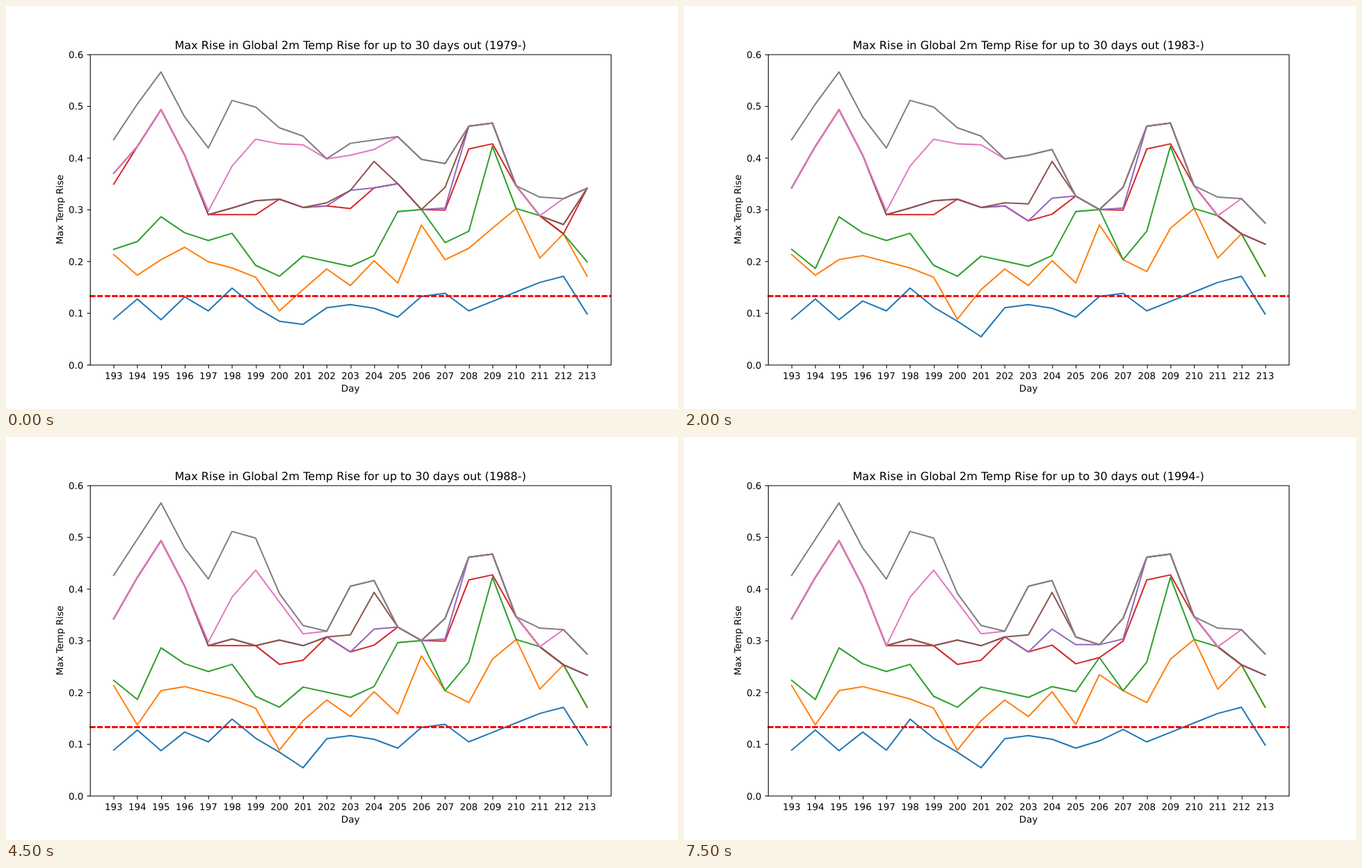
Animation, 966 px wide and 580 px high, one loop 8 s. Source, as an HTML page with a canvas:

```html
<!DOCTYPE html>
<html lang="en">
<head>
<meta charset="utf-8">
<title>Max temperature rise</title>
<style>
html, body { margin: 0; width: 966px; height: 580px; overflow: hidden; background: #fff; }
canvas { display: block; }
</style>
</head>
<body>
<canvas id="chart" width="966" height="580"></canvas>
<script>
const ctx = document.getElementById('chart').getContext('2d');
// The chart is laid out on a 1000 x 600 sheet and scaled to the stage.
const W = 1000, H = 600, LEFT = 125, RIGHT = 900, TOP = 72, BOTTOM = 534;
const POINT = 100 / 72, THIN = 0.8 * POINT, THICK = 1.5 * POINT, TICK = 3.5 * POINT;
const FIRST_DAY = 193, DAYS = 21, FIRST_YEAR = 1979, YEARS = 16, STEP = 500;
const THRESHOLD = 132.5;
const COLORS = ['#1f77b4', '#ff7f0e', '#2ca02c', '#d62728',
                '#9467bd', '#8c564b', '#e377c2', '#7f7f7f'];
const [BLUE, ORANGE, GREEN, RED, PURPLE, BROWN, PINK, GREY] = COLORS.keys();

const xOf = i => LEFT + (RIGHT - LEFT) * (i + 1) / (DAYS + 1);
const yOf = v => BOTTOM - (BOTTOM - TOP) * v / 600;
const snap = v => Math.round(v) + 0.5;

// A record lifts its line, and every line above it, until the year it drops out.
// Values are thousandths of a degree on successive days; gaps are straight runs.
const records = [];
const record = (line, day, values, until = Infinity) =>
  records.push({ line, start: day - FIRST_DAY, values: fillGaps(values), until });

function fillGaps(values) {
  const known = Object.keys(values).map(Number);
  return Array.from(values, (v, i) => {
    if (i in values) return v;
    const b = known.find(k => k > i), a = known[known.indexOf(b) - 1];
    return values[a] + (values[b] - values[a]) * (i - a) / (b - a);
  });
}

record(BLUE, 193, [88, 127, 87, 123, 88, 148, 111, 84, 54, 110, 116, 109, 92, 106, 128, 104, , , 159, 171, 98]);
record(ORANGE, 193, [213, 137, 203, 211, , 187, 169, 88, 145, 185, 153, 201, 138, 234, 203, 180, 264, 302, 206, 253, 171]);
record(GREEN, 193, [223, 186, 286, 255, 240, 254, 192, 171, 210, , 190, 211, 201, 267, 203, 258, 422, 302, 288, 253, 171]);
record(RED, 193, [342, 422, 493, 405, 290, , 290, 254, 262, 307, 278, 291, 255, 267, 299, 417, 427, 346, 288, 253, 233]);
record(PURPLE, 198, [303]);
record(PURPLE, 200, [301, 290]);
record(PURPLE, 204, [322, 292, 292, 303, 461, 467]);
record(BROWN, 203, [311, 393, 307]);
record(BROWN, 207, [343]);
record(PINK, 198, [384, 436, , 313, 318, 405, 416]);
record(PINK, 212, [321, 274]);
record(GREY, 193, [426, , 566, 479, 419, 511, 498, 391, 329]);
record(GREY, 211, [324]);

record(PINK, 206, [397, 389], 1980);
record(PURPLE, 212, [271], 1980);
record(GREEN, 213, [199], 1980);
record(RED, 213, [341], 1980);
record(ORANGE, 200, [104], 1981);
record(BLUE, 201, [78], 1981);
record(RED, 203, [302, 342, 350], 1982);
record(PURPLE, 203, [337], 1982);
record(PINK, 205, [441, 388, 362], 1982);
record(GREY, 203, [428, , 441], 1982);
record(GREEN, 207, [236], 1982);
record(ORANGE, 208, [225], 1982);
record(RED, 193, [349], 1983);
record(PURPLE, 193, [370], 1983);
record(GREEN, 194, [238], 1983);
record(ORANGE, 196, [227], 1983);
record(BLUE, 196, [131], 1983);
record(GREY, 193, [435, 504], 1986);
record(PURPLE, 199, [317], 1986);
record(RED, 200, [320, 304], 1986);
record(BROWN, 202, [313], 1986);
record(PINK, 200, [427, 425, 398], 1986);
record(GREY, 200, [458, 442], 1986);
record(ORANGE, 194, [173], 1988);
record(BLUE, 197, [104], 1991);
record(PINK, 197, [297], 1994);
record(BLUE, 206, [132, 138], 1994);
record(ORANGE, 205, [158, 270], 1994);
record(GREEN, 205, [296, 300], 1994);
record(RED, 205, [326], 1994);

function linesFor(year) {
  const lines = COLORS.map(() => Array(DAYS).fill(0));
  for (const r of records) {
    if (year >= r.until) continue;
    for (const line of lines.slice(r.line)) {
      r.values.forEach((v, i) => { line[r.start + i] = Math.max(line[r.start + i], v); });
    }
  }
  return lines;
}

function stroke(points, color, width, cap = 'butt', dash = []) {
  ctx.strokeStyle = color;
  ctx.lineWidth = width;
  ctx.lineCap = cap;
  ctx.setLineDash(dash);
  ctx.beginPath();
  points.forEach(([x, y]) => ctx.lineTo(x, y));
  ctx.stroke();
}

function text(str, x, y, align = 'center', points = 10) {
  ctx.font = `${points * POINT}px "DejaVu Sans", sans-serif`;
  ctx.textAlign = align;
  ctx.fillText(str, x, y);
}

function drawAxes() {
  const l = snap(LEFT), r = snap(RIGHT), t = snap(TOP), b = snap(BOTTOM);
  stroke([[l, t], [r, t], [r, b], [l, b], [l, t]], '#000', THIN, 'square');
  for (let i = 0; i < DAYS; i++) {
    const x = snap(xOf(i));
    stroke([[x, b], [x, b + TICK]], '#000', THIN);
    text(FIRST_DAY + i, xOf(i), 555);
  }
  for (let v = 0; v <= 600; v += 100) {
    const y = snap(yOf(v));
    stroke([[l, y], [l - TICK, y]], '#000', THIN);
    text((v / 1000).toFixed(1), LEFT - 2 * TICK, y + 5, 'right');
  }
  text('Day', (LEFT + RIGHT) / 2, 574);
  ctx.save();
  ctx.translate(85, (TOP + BOTTOM) / 2);
  ctx.rotate(-Math.PI / 2);
  text('Max Temp Rise', 0, 0);
  ctx.restore();
}

function draw(year) {
  ctx.setTransform(966 / W, 0, 0, 580 / H, 0, 0);
  ctx.textRendering = 'geometricPrecision';
  ctx.lineJoin = 'round';
  ctx.fillStyle = '#fff';
  ctx.fillRect(0, 0, W, H);
  ctx.fillStyle = '#000';
  const limit = Math.round(yOf(THRESHOLD));
  // The threshold is redrawn with every line, which makes its dashes bolder.
  linesFor(year).forEach((line, k) => {
    stroke(line.map((v, i) => [xOf(i), yOf(v)]), COLORS[k], THICK, 'square');
    stroke([[LEFT, limit], [RIGHT, limit]], '#f00', THICK, 'butt', [3.7 * THICK, 1.6 * THICK]);
  });
  drawAxes();
  text(`Max Rise in Global 2m Temp Rise for up to 30 days out (${year}-)`,
    (LEFT + RIGHT) / 2, 64, 'center', 12);
}

const start = performance.now();
let shown;
function tick() {
  const year = FIRST_YEAR + Math.floor((performance.now() - start) / STEP) % YEARS;
  if (year !== shown) draw(shown = year);
  requestAnimationFrame(tick);
}
tick();
</script>
</body>
</html>
```
